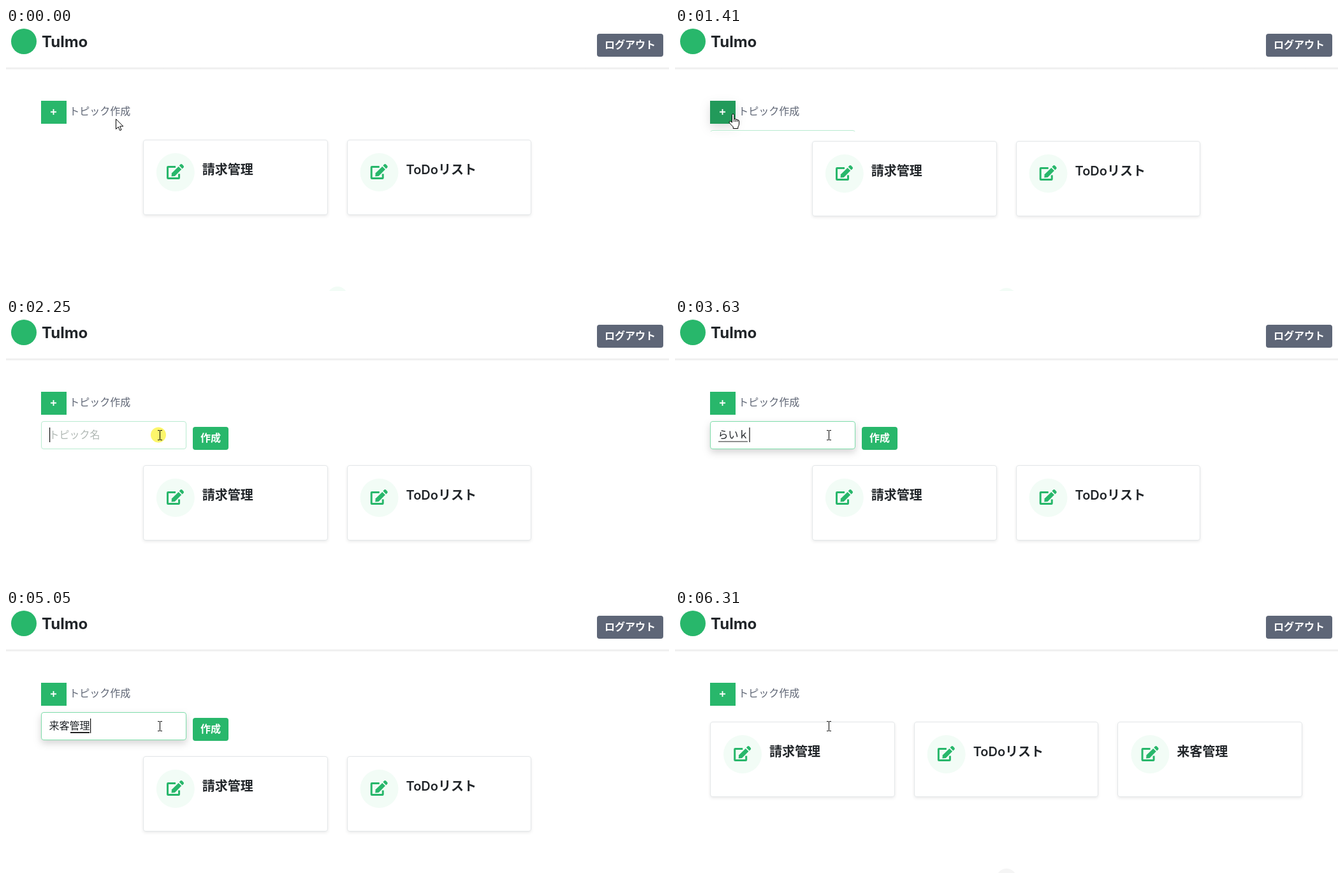
Write an HTML page that moves like this. It is 1040 px wide and 412 px high and loops after 7.93 s.

```html
<!DOCTYPE html>
<html lang="ja">
<head>
<meta charset="utf-8">
<title>トピック作成</title>
<style>
  html, body { margin: 0; width: 100%; height: 100%; overflow: hidden; background: #fff; }
  svg { display: block; width: 1040px; height: 412px; }
  text { font: 350 16px "Noto Sans CJK JP", "Noto Sans CJK", sans-serif; fill: #212529; white-space: pre; }
  .bold { font-weight: 700; }
  .white { fill: #fff; }
  .title { font-size: 20px; font-weight: 700; }
  .latin { font: 600 20px Inter, sans-serif; }
  .brand { font: 700 24px Inter, sans-serif; }
  .card { fill: #fff; stroke: #e3e6e8; filter: drop-shadow(0 2px 2px rgba(0, 0, 0, .08)); }
  .focus { filter: drop-shadow(0 5px 6px rgba(0, 0, 0, .17)); }
  .hover { filter: drop-shadow(0 6px 8px rgba(0, 0, 0, .13)); }
</style>
</head>
<body>
<svg viewBox="0 0 1040 412">
  <defs>
    <linearGradient id="fade" x2="0" y2="1">
      <stop stop-color="#e8e8e8"/>
      <stop offset="1" stop-color="#fff"/>
    </linearGradient>
    <clipPath id="slide"><rect id="slideBox" x="0" y="160" width="1040" height="0"/></clipPath>
    <g id="edit">
      <circle cx="51" cy="51" r="30" fill="#f2fcf6"/>
      <g transform="translate(37.2 38)" fill="#28b76b">
        <path d="M14 4.5H2.3Q1.5 4.5 1.5 5.3V21.7Q1.5 22.5 2.3 22.5H18.7Q19.5 22.5 19.5 21.7V15.6" fill="none" stroke="#28b76b" stroke-width="3"/>
        <path d="M18.6 3.9 23.2 8.5 12.9 19 7.5 19.6 8 14.2Z"/>
        <path d="M19.7 2.6 21.6.6Q22.9-.4 24.2.6L26.5 2.9Q27.5 4.2 26.5 5.5L24.5 7.4Z"/>
      </g>
    </g>
  </defs>

  <rect y="62" width="1040" height="4" fill="url(#fade)"/>
  <circle id="logo" cx="28" cy="21" r="20" fill="#28b76b"/>
  <text class="brand" x="56" y="30">Tulmo</text>
  <rect x="927" y="9" width="104" height="36" rx="4" fill="#5e6677"/>
  <text class="bold white" x="979" y="32" text-anchor="middle">ログアウト</text>

  <rect id="add" x="55" y="114" width="40" height="36"/>
  <path d="M70 131.5H79M74.5 127V136" stroke="#fff" stroke-width="1.8"/>
  <text x="99.3" y="135.7" style="fill:#5f6675">トピック作成</text>

  <circle id="dot" cx="520" r="16"/>
  <g id="cards"></g>

  <g id="form">
    <rect id="field" x="55.5" y="160.5" width="227" height="43" rx="3.5" fill="#fff"/>
    <text id="value" x="67.5" y="187"></text>
    <rect id="under" fill="#222"/>
    <rect id="caret" y="170" width="1.2" height="23" fill="#111"/>
    <rect x="293" y="169" width="56" height="36" rx="4" fill="#28b76b"/>
    <text class="bold white" x="321" y="192" text-anchor="middle">作成</text>
  </g>

  <circle id="press" r="12" fill="#fdf66b"/>
  <g id="cursor" stroke="#000">
    <path id="arrow" fill="#fff" d="M.5.7V16.4L4.2 12.9 6.6 18.5 9 17.5 6.6 12H11.8Z"/>
    <g id="hand" fill="#fff">
      <path d="M5.5 14V2.3A1.6 1.6 0 0 1 8.7 2.3V8.6Q10.3 7.8 11.5 9.2 13 8.7 14.2 10 16.5 9.8 16.5 12V16Q16.5 19 14.8 21V23.5H7.3V21L1.3 14.7Q.5 12.3 2.5 12 4 12.2 5.5 14Z"/>
      <path fill="none" d="M8.7 8.5V13M11.5 9.2V13M14.2 10V13"/>
    </g>
    <path id="beam" fill="none" d="M-3-7.5H0M1-7.5H4M.5-7V7M-3 7.5H0M1 7.5H4"/>
  </g>
</svg>

<script>
const LOOP = 7930, GREEN = '#28b76b';
const CARD = 289.67, COLUMN = 319.67;
const $ = id => document.getElementById(id);
const set = (id, attrs) => {
  for (const key in attrs) $(id).setAttribute(key, attrs[key]);
};
const show = (id, on) => { $(id).style.display = on ? '' : 'none'; };
const within = (t, from, to) => t >= from && t < to;
const at = (steps, t) => steps.filter(s => s[0] <= t).pop();

// time, shape, x, y
const pointer = [
  [0, 'arrow', 172, 142], [80, 'arrow', 166, 141], [150, 'arrow', 148, 137],
  [230, 'arrow', 124, 132], [310, 'arrow', 104, 128], [390, 'arrow', 94, 127],
  [540, 'hand', 80, 124], [620, 'hand', 69, 123], [690, 'hand', 75, 128],
  [770, 'hand', 84, 134], [1560, 'arrow', 104, 139], [1640, 'arrow', 143, 152],
  [1720, 'arrow', 192, 168], [1800, 'beam', 229, 179], [1880, 'beam', 241, 182],
  [6000, 'arrow', 240, 181], [6080, 'beam', 241, 182]
];

// time, committed text, text being composed, underline thickness
const typing = [
  [0, '', '', 0], [3260, '', 'ｒ', 1], [3340, '', 'ら', 1], [3500, '', 'らい', 1],
  [3630, '', 'らいｋ', 1], [3810, '', 'らいｋｙ', 1], [3890, '', 'らいきゃ', 1],
  [4030, '', 'らいきゃｋ', 1], [4260, '', 'らいきゃく', 1], [4350, '', '来客', 2],
  [4510, '来客', 'ｋ', 1], [4650, '来客', 'か', 1], [4730, '来客', 'かｎ', 1],
  [4880, '来客', 'かんり', 1], [5050, '来客', '管理', 2], [5370, '来客管理', '', 0]
];

const titles = ['請求管理', '<tspan class="latin">ToDo</tspan>リスト', '来客管理'];
$('cards').innerHTML = titles.map((title, i) => `
  <g id="card${i}">
    <rect class="card" id="frame${i}" y=".5" height="117" rx="3.5"/>
    <use href="#edit"/>
    <text class="title" x="93" y="54">${title}</text>
  </g>`).join('');

// Frames snap to whole pixels, their contents do not.
function placeCard(i, x, y) {
  const left = Math.round(x), right = Math.round(x + CARD);
  set('card' + i, { transform: `translate(${x} ${y})` });
  set('frame' + i, { x: left - x + .5, width: right - left - 1 });
}

function drawField(t) {
  const [, done, draft, weight] = at(typing, t);
  const text = done + draft;
  const focused = t >= 2330;
  $('value').textContent = text || 'トピック名';
  $('value').style.fill = text ? '#212529' : '#b0b8b4';
  set('field', { stroke: focused ? '#7fdcaa' : '#b9ebd0', class: focused ? 'focus' : '' });
  set('under', {
    x: 68 + done.length * 16 + (done ? 1 : 0), y: weight === 2 ? 191 : 191.5,
    width: Math.max(0, draft.length * 16 - 2), height: weight
  });
  set('caret', { x: 68 + text.length * 16 + (draft && weight === 1 ? .4 : 0) });
  show('caret', within(t, 2250, 2810) || within(t, 3260, 5920));
}

function render(t) {
  const saved = t >= 6230;
  const p = Math.min(1, Math.max(0, (t - 1360) / 400));
  const drop = saved || t < 1410 ? 0 : 54 * (.5 - Math.cos(Math.PI * p) / 2);

  const first = saved ? 55 : 55 + COLUMN / 2;
  titles.forEach((_, i) => placeCard(i, first + i * COLUMN, Math.round(175 + drop)));
  show('card2', saved);
  set('dot', { cy: 421 + drop, fill: saved ? '#f5f5f5' : '#f2fcf6' });
  show('logo', !within(t, 6230, 6310));

  const hover = within(t, 540, 1560);
  set('add', { fill: hover ? '#229a5a' : GREEN, class: hover ? 'hover' : '' });

  show('form', drop > 0);
  set('slideBox', { height: drop });
  set('form', { 'clip-path': drop < 54 ? 'url(#slide)' : 'none' });
  drawField(t);

  const [, shape, x, y] = at(pointer, t);
  set('cursor', { transform: `translate(${x} ${y})` });
  ['arrow', 'hand', 'beam'].forEach(id => show(id, id === shape));

  const opening = within(t, 1240, 1410);
  show('press', opening || within(t, 2250, 2330));
  set('press', opening ? { cx: 89, cy: 134 } : { cx: 239, cy: 181.5 });
}

const start = performance.now();
function tick() {
  render((performance.now() - start) % LOOP);
  requestAnimationFrame(tick);
}
tick();
</script>
</body>
</html>
```
